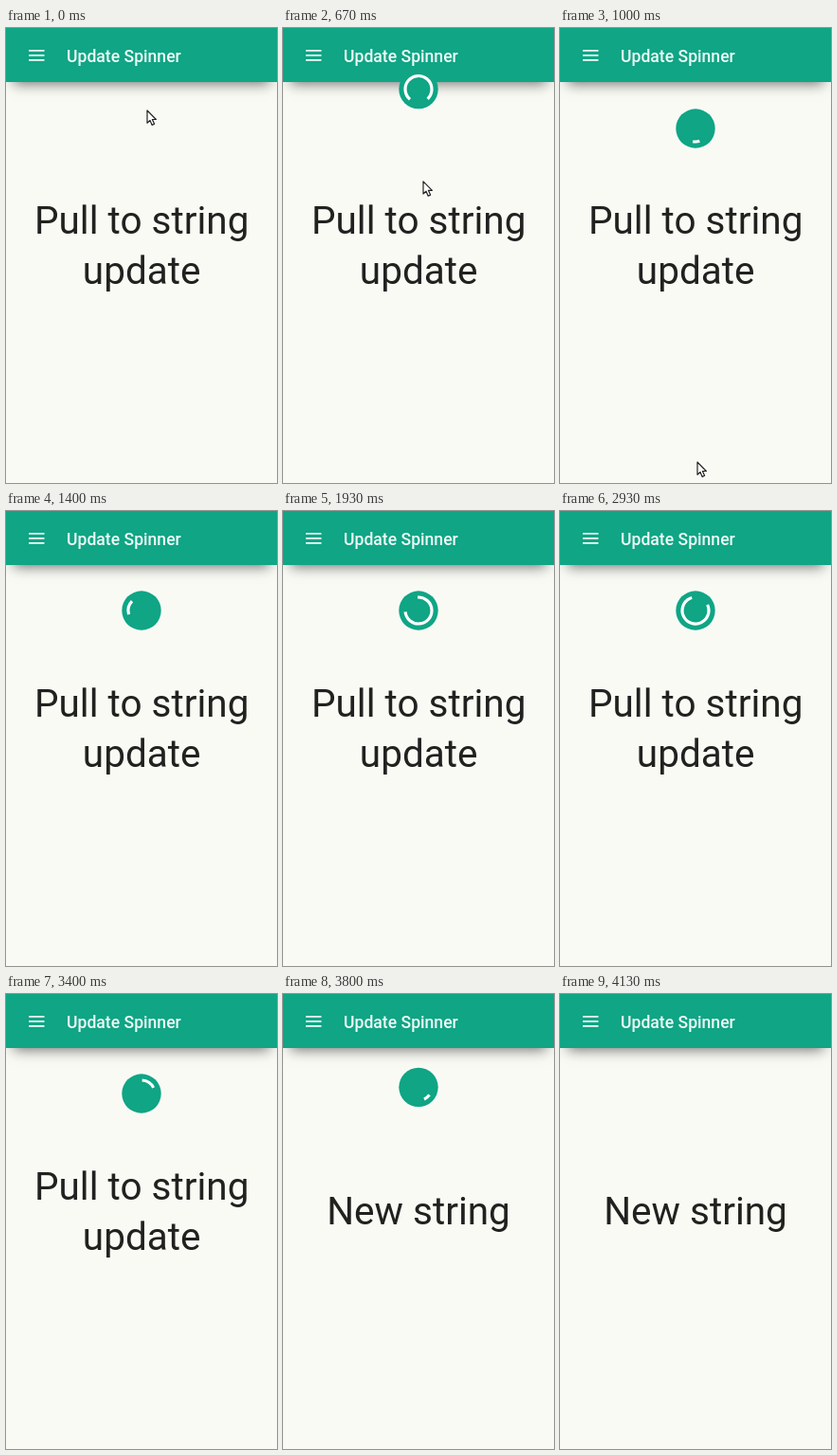
An HTML page that plays this animation: 286 px wide and 480 px high, repeating every 4590 ms.

```html
<!DOCTYPE html>
<html lang="en">
<head>
<meta charset="utf-8">
<title>Update Spinner</title>
<style>
  html, body { margin: 0; width: 100%; height: 100%; overflow: hidden; background: #fafaf5; }
  header {
    position: absolute; top: 0; left: 0; width: 286px; height: 57px; background: #0fa585;
    box-shadow: 0 10px 13px -8px rgba(0, 0, 0, .55);
  }
  svg { position: absolute; top: 0; left: 0; }
  text { font-family: Roboto, sans-serif; }
  .big { font-size: 40.5px; fill: #212120; text-anchor: middle; }
</style>
</head>
<body>
<header></header>
<svg width="286" height="480" viewBox="0 0 286 480">
  <path d="M24 23.8h16.5M24 28.8h16.5M24 33.8h16.5" stroke="#f2fbf8" stroke-width="1.8"/>
  <text x="64" y="36" font-size="17.6" font-weight="500" fill="#eefaf6">Update Spinner</text>
  <g id="before" class="big">
    <text x="143.2" y="216.5">Pull to string</text>
    <text x="143.2" y="270">update</text>
  </g>
  <text id="after" class="big" x="143" y="243">New string</text>
  <g id="spinner">
    <circle r="20.7" fill="#0fa585"/>
    <circle id="arc" r="14" fill="none" stroke="#fff" stroke-width="3.2" pathLength="360"/>
  </g>
  <path id="cursor" d="M0 0V13.2L3 10.4L5.2 15.4L7.6 14.3L5.4 9.5H9.4Z"
        fill="#fff" stroke="#222" stroke-width="1.2" stroke-linejoin="round"/>
</svg>
<script>
const LOOP = 4590, TICK = 200 / 3, LAST_TICK = 62;
const PERIOD = 1227, FIRST_MIN = 1173 - PERIOD; // arc is shortest once per period
const SWEEP = 278, MIN_ARC = 5;
const TEXT_CHANGE = 3790, RETRACT = 3740;

const $ = id => document.getElementById(id);
const clamp = (v, lo, hi) => Math.min(hi, Math.max(lo, v));
const inOutCubic = x => x < .5 ? 4 * x ** 3 : 1 - 4 * (1 - x) ** 3;
const show = (el, on) => el.setAttribute('visibility', on ? 'visible' : 'hidden');
const move = (el, x, y) => el.setAttribute('transform', `translate(${x} ${y})`);

// [time, x, y]
const cursorPath = [
  [0, 149, 87], [470, 149, 88], [533, 148.5, 96], [600, 148, 122],
  [667, 148, 162], [1000, 145, 458], [1067, 145, 444]
];

function cursorAt(t) {
  const i = cursorPath.findIndex(p => p[0] > t);
  if (i < 0) return cursorPath.at(-1).slice(1);
  const [a, b] = [cursorPath[i - 1], cursorPath[i]];
  const u = (t - a[0]) / (b[0] - a[0]);
  return [1, 2].map(k => a[k] + (b[k] - a[k]) * u);
}

function spinnerY(t, pullY) {
  if (t < 1100) return Math.min(106, -20 + 1.13 * (pullY - 87));
  return 105 - 125 * clamp((t - RETRACT) / 260, 0, 1) ** 2;
}

// The head runs ahead in the first half of a period, the tail catches up in the second.
function drawArc(t) {
  const cycles = (t - FIRST_MIN) / PERIOD, n = Math.floor(cycles);
  const phase = 2 * (cycles - n);
  const head = inOutCubic(clamp(phase, 0, 1));
  const tail = inOutCubic(clamp(phase - 1, 0, 1));
  const turn = 104 + .165 * t + SWEEP * (n + tail);
  $('arc').setAttribute('stroke-dasharray', `${MIN_ARC + SWEEP * (head - tail)} 360`);
  $('arc').setAttribute('transform', `rotate(${turn - 90})`);
}

function draw(t) {
  const [x, y] = cursorAt(t), cy = spinnerY(t, y);
  move($('cursor'), x, y);
  show($('cursor'), t < 1100);
  move($('spinner'), 143, cy);
  show($('spinner'), cy > -19);
  drawArc(t);
  show($('before'), t < TEXT_CHANGE);
  show($('after'), t >= TEXT_CHANGE);
}

const start = performance.now();
function loop() {
  const t = (performance.now() - start) % LOOP;
  draw(Math.min(LAST_TICK, Math.floor((t + 3.5) / TICK)) * TICK);
  requestAnimationFrame(loop);
}
loop();
</script>
</body>
</html>
```
